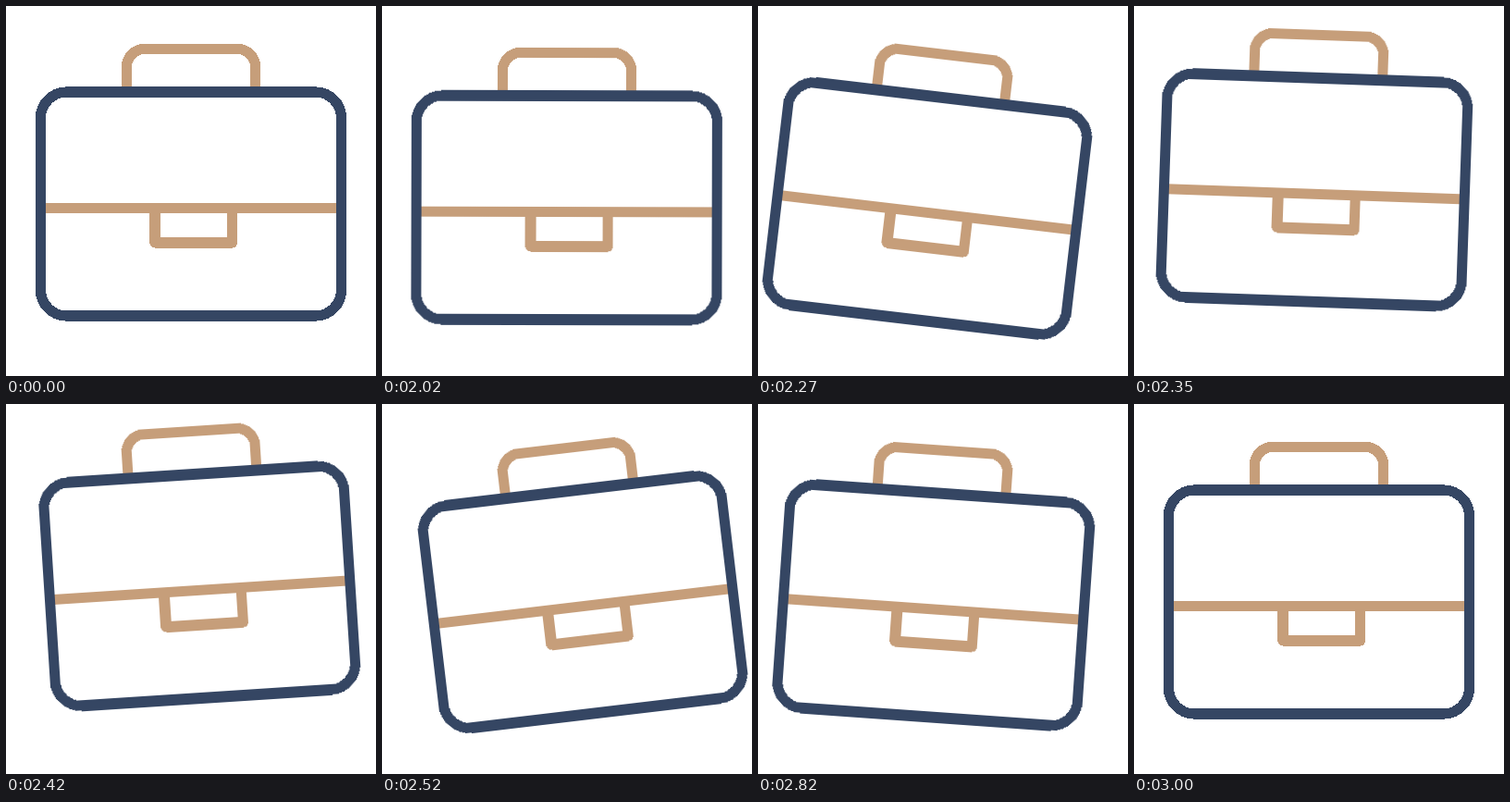
Animation, 400 px wide and 400 px high, one loop 3020 ms. Source, as an HTML page without scripts:

```html
<!DOCTYPE html>
<html lang="en">
<head>
<meta charset="utf-8">
<title>Swinging briefcase</title>
<style>
  html, body {
    margin: 0;
    width: 100%;
    height: 100%;
    overflow: hidden;
    background: #fff;
  }
  svg {
    display: block;
    width: 100%;
    height: 100%;
    shape-rendering: crispEdges;
  }
  path, rect {
    fill: none;
    stroke: #c69e7a;
    stroke-width: 11.2;
    stroke-linejoin: round;
  }
  .body { stroke: #354663; }

  .bounce, .swing {
    animation: 3020ms cubic-bezier(.333, 0, .667, 1) infinite;
  }
  .bounce { animation-name: bounce; }
  .swing {
    animation-name: swing;
    transform-origin: 200px 69px;
  }

  /* Rests for 2 s, then moves for 1 s */
  @keyframes bounce {
    0% { transform: translateY(0); }
    66.225% {
      transform: translateY(0);
      animation-timing-function: cubic-bezier(.25, 0, .667, 1);
    }
    70.364% { transform: translateY(39px); }
    79.139% { transform: translateY(-18.5px); }
    86.921% { transform: translateY(15px); }
    96.589%, 100% { transform: translateY(0); }
  }
  @keyframes swing {
    0%, 66.225% { transform: rotate(0deg); }
    74.503% { transform: rotate(7deg); }
    82.781% { transform: rotate(-7deg); }
    91.06% { transform: rotate(5deg); }
    99.338%, 100% { transform: rotate(0deg); }
  }
</style>
</head>
<body>
<svg viewBox="0 0 400 400">
  <g class="bounce">
    <g class="swing">
      <path class="handle" d="M130.500 92V65.500a19 19 0 0 1 19-19h101a19 19 0 0 1 19 19V92"/>
      <path class="flap" d="M38 218.200H362"/>
      <path class="clasp" d="M161 218V256H244.500V218"/>
      <rect class="body" x="37.500" y="93" width="325" height="242" rx="28"/>
    </g>
  </g>
</svg>
</body>
</html>
```
